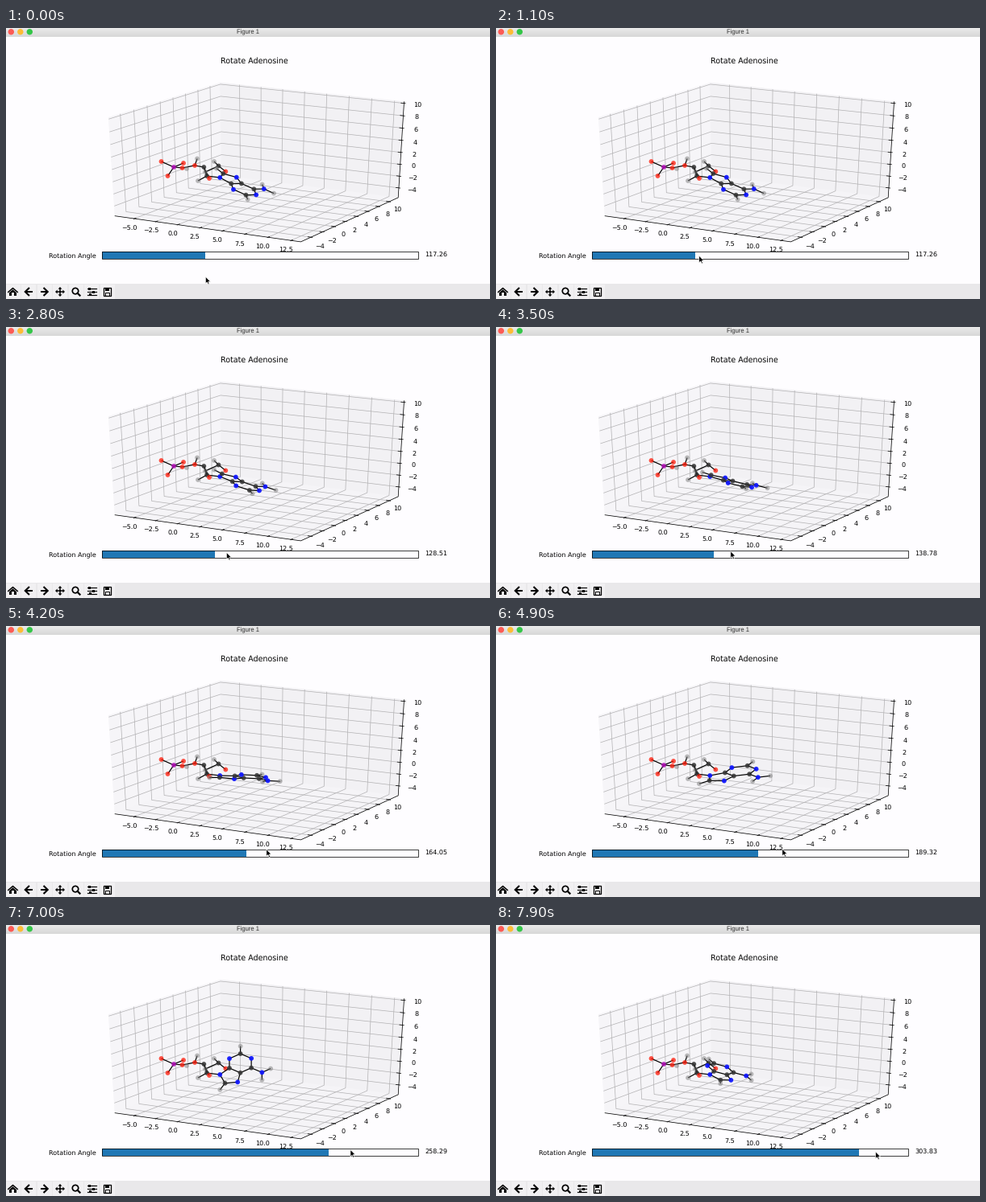
Write a matplotlib script that moves like this. It is 600 by 337 pixels and loops after 8000 ms.

```python
import numpy as np
import matplotlib.pyplot as plt
from matplotlib.animation import FuncAnimation
from matplotlib.collections import LineCollection
from matplotlib.patches import Circle, Polygon, Rectangle

W, H, DPI = 600, 337, 64
PT = 72 / DPI  # points per pixel
FRAMES, STEP = 80, 100
PAPER = "#fefdff"

plt.rcParams["font.family"] = "DejaVu Sans"
plt.rcParams["text.hinting"] = "no_hinting"
fig = plt.figure(figsize=(W / DPI, H / DPI), dpi=DPI, facecolor=PAPER)
ax = fig.add_axes([0, 0, 1, 1])
ax.set_xlim(0, W)
ax.set_ylim(H, 0)
ax.axis("off")


def add(patch, color, z, ec="none", lw=0, **kw):
    patch.set(fc=color, ec=ec, lw=lw * PT, zorder=z, **kw)
    return ax.add_patch(patch)


def poly(pts, color, z=1, **kw):
    return add(Polygon(pts, closed=True), color, z, **kw)


def rect(x, y, w, h, color, z=1, **kw):
    return add(Rectangle((x, y), w, h), color, z, **kw)


def dot(x, y, r, color, z=1, **kw):
    return add(Circle((x, y), r), color, z, **kw)


def line(pts, lw=1.0, z=2, **kw):
    ax.plot(*np.transpose(pts), color="black", lw=lw * PT, zorder=z, **kw)


def lines(segs, color, lw, z):
    return ax.add_collection(LineCollection(segs, colors=color,
                                            linewidths=lw * PT, zorder=z))


def text(x, y, s, size, ha="center", z=3, **kw):
    return ax.text(x, y, s, fontsize=size * PT, ha=ha, va="baseline",
                   zorder=z, **kw)


def polar(deg, r=1.0):
    a = np.radians(deg)
    return r * np.array([np.cos(a), np.sin(a)])


# ---- 3D box -------------------------------------------------------------
AZ, EL, DIST = np.radians(-60.5), np.radians(25), 10
RIGHT = np.array([-np.sin(AZ), np.cos(AZ), 0])
EYE = np.array([np.cos(EL) * np.cos(AZ), np.cos(EL) * np.sin(AZ), np.sin(EL)])
UP = np.cross(EYE, RIGHT)


def project(p):
    """Unit-cube point to pixels."""
    p = np.array(p) - 0.5
    k = DIST / (DIST - EYE @ p)
    return 313.6 + 263 * k * (RIGHT @ p), 163 - 133.2 * k * (UP @ p)


def draw_box():
    def path(*pts):
        return [project(p) for p in pts]

    for axis, side, color in ((0, 0, "#f6f5f8"), (1, 1, "#f2f1f4"),
                              (2, 0, "#f5f4f7")):
        square = [np.insert(c, axis, side)
                  for c in ((0, 0), (0, 1), (1, 1), (1, 0))]
        poly(path(*square), color, ec=color, lw=0.7)

    # ticks, limits, grid path, axis edge, tick direction, label direction
    axes = (
        (np.arange(-5, 13, 2.5), -7.25, 13.53,
         lambda f: [(f, 0, 0), (f, 1, 0), (f, 1, 1)], 0, (0, -1, 0), (0, -1, -1)),
        (np.arange(-4, 11, 2), -5.69, 11.74,
         lambda f: [(1, f, 0), (0, f, 0), (0, f, 1)], 0, (1, 0, 0), (1, 0, -1)),
        (np.arange(-4, 11, 2), -5.67, 10.24,
         lambda f: [(0, 0, f), (0, 1, f), (1, 1, f)], 2, (1, 0, 0), (1, 1, 0)),
    )
    grid, ticks = [], []
    for values, lo, hi, route, end, out, shift in axes:
        for v in values:
            pts = route((v - lo) / (hi - lo))
            edge, out, shift = np.array(pts[end]), np.array(out), np.array(shift)
            grid.append(path(*pts))
            ticks.append(path(edge + 0.009 * out, edge - 0.017 * out))
            x, y = project(edge + 0.048 * shift)
            text(x, y + 6.1, str(v).replace("-", "\u2212"), 8)
    lines(grid, "#b3b2b4", 0.72, 2)
    lines(ticks, "black", 0.75, 3)
    line(path((0, 0, 0), (1, 0, 0), (1, 1, 0), (1, 1, 1)), lw=0.75, z=3)


# ---- molecule -----------------------------------------------------------
RGBA = {
    "P": (0.70, 0.05, 0.72, 0.85),
    "O": (1.00, 0.10, 0.03, 0.75),
    "C": (0.20, 0.20, 0.20, 0.85),
    "N": (0.05, 0.08, 1.00, 0.92),
    "H": (0.50, 0.50, 0.50, 0.52),
}

# Phosphate and sugar, in pixels
SUGAR = {
    "P": (208, 173), "O1": (192.5, 166), "O2": (200.5, 184), "O3": (220, 168),
    "O4": (218.5, 174), "H4": (224, 175), "O5": (234, 171), "H5": (237, 162.5),
    "C4": (245.3, 173), "H3": (247, 179), "C1": (249, 184), "H1": (238, 190),
    "O6": (252, 187), "C2": (263.5, 171.5), "H2": (258, 166), "O7": (272.3, 178.5),
}
SUGAR_BONDS = ("O1-P-O2 O3-P-O4-O5-C4-H3-C2-O7 O5-H5 C4-O6 H2-C2 "
               "C4-C1-H1 H3-C1-N9")

BASE_BONDS = ("N9-C8-N7-C5-C4-N9 C4-N3-C2-N1-C6-C5 C8-H8 C2-H2 "
              "C6-N6-H61 N6-H62")


def purine(side=1.37, ch=1.08, cn=1.34):
    """Flat adenine: a pentagon and a hexagon on one edge, N9 at the origin."""
    r5 = side / (2 * np.sin(np.pi / 5))
    mid5 = np.array([r5, 0])
    mid6 = mid5 + polar(-72, r5 * np.cos(np.pi / 5) + side * np.sqrt(0.75))
    at = {n: mid5 + polar(180 - 72 * i, r5)
          for i, n in enumerate(("N9", "C8", "N7", "C5", "C4"))}
    at |= {n: mid6 + polar(18 - 60 * i, side)
           for i, n in enumerate(("C6", "N1", "C2", "N3"))}
    at["N6"] = at["C6"] + polar(18, cn)
    at["H8"] = at["C8"] + polar(108, ch)
    at["H2"] = at["C2"] + polar(-102, ch)
    at["H61"] = at["N6"] + polar(-42, ch)
    at["H62"] = at["N6"] + polar(78, ch)
    return at


def pairs(bonds):
    chains = (b.split("-") for b in bonds.split())
    return [p for c in chains for p in zip(c, c[1:])]


BASE = purine()
UV = np.array(list(BASE.values()))
ROW = {name: i for i, name in enumerate(BASE)}
PAIRS = np.array([[ROW[a], ROW[b]] for a, b in pairs(BASE_BONDS)])
PIVOT = np.array([265.2, 186])


def base_points(deg):
    """Adenine turned about the sugar bond."""
    along = np.array([11.2, 1.68])
    across = np.array([8 * np.cos(np.radians(deg)) - 0.8,
                       8.6 * np.cos(np.radians(deg - 248.5))])
    return PIVOT + UV[:, :1] * along + UV[:, 1:] * across


def atoms(pts, names, z):
    return ax.scatter(*np.transpose(pts), s=(5.8 * PT) ** 2, linewidths=0,
                      c=[RGBA[n[0]] for n in names], zorder=z)


# ---- window frame -------------------------------------------------------
def draw_window():
    for i in range(11):
        rect(0, i, W, 1.05, str(0.915 - 0.007 * i), 8)
    rect(0, 10.6, W, 0.7, "#b8b6b8", 8)
    for i, c in enumerate(("#fc5b55", "#fdbc35", "#34c648")):
        dot(6.3 + 11.5 * i, 4.8, 3.7, c, 9)
    text(299.5, 7.6, "Figure 1", 7.6, z=9, family="Liberation Sans",
         color="#303030")
    rect(0, 318, W, 19, "#e9e8ea", 8)
    for i in range(7):
        rect(19.5 * i - 0.5, 318.6, 18.3, 18.4, "#f1f0f2", 8)


def draw_icons():
    y, z = 328, 9
    home, pan, zoom, conf, save = 8.5, 67, 86, 106, 125.5
    line([(home - 5.7, y + 0.4), (home, y - 4.5), (home + 5.7, y + 0.4)],
         lw=1.5, z=z)
    poly([(home - 4.2, y + 1), (home, y - 2.8), (home + 4.2, y + 1)], "black", z)
    for x in (home - 4.2, home + 1.2):
        rect(x, y + 0.8, 3, 4, "black", z)
    for x, s in ((28, 1), (47.5, -1)):
        line([(x - 4 * s, y), (x + 5 * s, y)], lw=2, z=z, solid_capstyle="butt")
        line([(x + 0.2 * s, y - 4.3), (x - 4.2 * s, y), (x + 0.2 * s, y + 4.3)],
             lw=2.1, z=z, solid_joinstyle="miter")
    for a in range(0, 360, 90):
        mid = np.array([pan, y])
        line([mid, mid + polar(a, 4)], lw=1.5, z=z)
        poly([mid + polar(a, 6), mid + polar(a + 36, 4.2),
              mid + polar(a - 36, 4.2)], "black", z)
    dot(zoom, y - 0.9, 3.7, "none", z, ec="black", lw=1.7)
    line([(zoom + 2.7, y + 1.8), (zoom + 5.5, y + 4.6)], lw=2.2, z=z)
    for i, knob in enumerate((-2.5, 2.5, -1.5)):
        row = y + 3.6 * (i - 1)
        line([(conf - 5.5, row), (conf + 5.5, row)], lw=1.2, z=z)
        rect(conf + knob - 1.1, row - 1.5, 2.2, 3, "black", z)
    rect(save - 4.8, y - 4.6, 9.6, 9.4, "none", z, ec="black", lw=1.3)
    rect(save - 2.8, y - 4.6, 4.8, 3.4, "black", z)
    rect(save - 2.6, y + 1, 5.2, 3.6, "none", z, ec="black", lw=1)


# ---- scene --------------------------------------------------------------
SX, SY, SW, SH = 119.2, 278, 392, 9
draw_box()
draw_window()
draw_icons()
text(307.6, 43.4, "Rotate Adenosine", 9.55)
text(111.8, 284.9, "Rotation Angle", 8.05, ha="right")
value = text(519, 284.9, "", 8.05, ha="left")

rect(SX, SY, SW, SH, PAPER, 4)
bar = rect(SX, SY, 0, SH, "#1f77b4", 5)
rect(SX, SY, SW, SH, "none", 6, ec="black", lw=0.75)

joints = SUGAR | {"N9": PIVOT}
lines([[joints[a], joints[b]] for a, b in pairs(SUGAR_BONDS)], "black", 1.2, 4)
atoms(list(SUGAR.values()), SUGAR, 5)
bonds = lines([], "black", 1.2, 6)
base = atoms(base_points(0), BASE, 7)

ARROW = np.array([(0, 0), (0, 8.6), (2, 6.8), (3.3, 9.8), (4.7, 9.2),
                  (3.4, 6.3), (6, 6.1)])
cursor = poly(ARROW, "black", 10, ec="white", lw=0.6)

# Drag: time, slider angle, how far the pointer runs ahead of the bar
DRAG = np.array([
    (0, 117.26, 0.5), (1400, 117.26, 6), (1500, 118.25, 6), (2100, 118.25, 8),
    (3500, 138.78, 20.5), (4900, 189.32, 29.5), (5800, 217.75, 18.5),
    (7000, 258.29, 26.5), (7900, 303.83, 20.5),
])


def update(i):
    t = i * STEP
    deg, lead = (np.interp(t, DRAG[:, 0], col) for col in DRAG.T[1:])
    end = SW * deg / 360
    pts = base_points(deg)
    base.set_offsets(pts)
    bonds.set_segments(pts[PAIRS])
    bar.set_width(end)
    value.set_text(f"{deg:.2f}")
    y = 277.2 + min(0.6 * (t / 1000 - 5.1) ** 2, 6) + 26 * max(0, 1 - t / 900)
    cursor.set_xy(ARROW + (SX + end + lead, y))
    return base, bonds, bar, value, cursor


anim = FuncAnimation(fig, update, frames=FRAMES, interval=STEP, repeat=True,
                     repeat_delay=0, blit=False)
plt.show()
```
